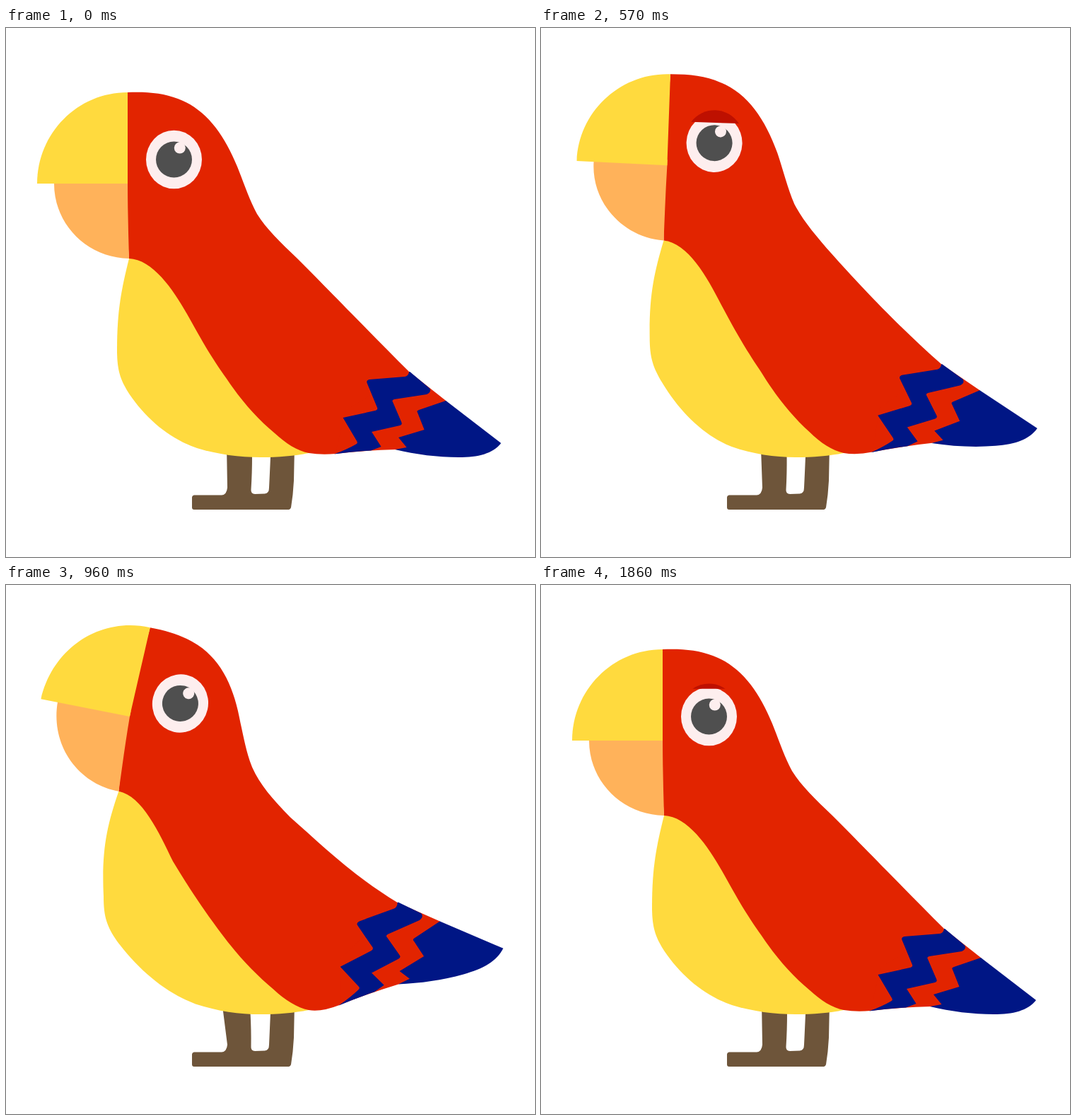
An HTML page for the animation above (1.89 s loop, 748 by 748 pixels).

```html
<!DOCTYPE html>
<html lang="en">
<head>
<meta charset="utf-8">
<title>Parrot</title>
<style>
  html, body { margin: 0; width: 100%; height: 100%; overflow: hidden; background: #fff; }
  svg { display: block; width: 100vw; height: 100vh; }
  .red { fill: #e22400; }
  .yellow { fill: #ffda3e; }
  .orange { fill: #ffb25a; }
  .blue { fill: #001685; }
  .brown { fill: #6e553a; }
  .white { fill: #fdeeee; }
  .pupil { fill: #4f4f4f; }
  .lid { fill: #be1000; }
</style>
</head>
<body>
<!-- The bird at rest; the script bends every path with its bone -->
<svg viewBox="0 0 748 748">
  <path class="brown" data-bone="leg" d="M312 590L313 650Q312 660 305 660.5L266 660.5Q263 661 263 664L263 678Q263 681 266 681L400 681Q402 681 403 678Q406 660 407 640L408 590L374 590L374 606Q373 630 372 650Q372 658 366 658.5L352 659Q346 658.5 346.5 653Q348 630 348 604L348 590Z"/>
  <path class="yellow" data-bone="body" d="M174 326C163 370 157 400 157 455C157 485 162 498 174 517C199 554 232 581 270 594C300 603 330 607 360 607C385 607 408 605 428 601L400 480L280 330Z"/>
  <path class="red" data-bone="body" d="M172 91C200 90 222 92 243 100C283 115 308 150 327 196C336 218 344 243 355 263C368 284 388 303 412 326C450 364 515 431 570 486L466 602Q446 604 428 601C412 598 395 587 380 573C355 552 335 530 312 496C290 465 278 444 258 408C238 372 208 327 174 326L166 220Z"/>
  <path class="red" data-bone="tail" d="M570 486L622 527L640 570L600 600L551 596Q510 597 466 602L480 540Z"/>
  <path class="blue" data-bone="tail" d="M571 486L599 509.5Q602 515 595 518L549 525Q545 526 547 529L559 557Q561 561 557 562L517 571L530.5 592L516 597.5Q490 599 464 602.5Q482 596 495 588.5Q498 587 496 584L476.5 551L522 541Q526 540 525 537L510.5 502Q509 498 514 497L564 493Q569 492 570 486Z"/>
  <path class="blue" data-bone="tail" d="M622 527L584 540Q580 541 582 544L591.5 568L555 579L566.5 593L550 596C580 603 610 607 640 607C668 607 688 602 700 587Z"/>
  <path class="orange" data-bone="body" d="M68 220C68 278 115 325 174 326C173 290 172 255 172 220L172 212L70 214Z"/>
  <path class="yellow" data-bone="body" d="M44 220C44 149 101 91 172 91C172 140 172 175 172 220Z"/>
  <g id="eye">
    <ellipse class="white" rx="39.5" ry="41.3"/>
    <circle class="pupil" r="25.5"/>
    <circle class="white" cx="8.3" cy="-16.5" r="8"/>
    <path id="lid" class="lid"/>
  </g>
</svg>
<script>
const LOOP = 1890, CYCLE = 1800, STEP = 30;
const JOINT = [172, 220], PIVOT = [466, 602], EYE = [237.5, 186];
const LID_OPEN = -46.5, LID_LOW = 11;

// x, y: head shift; head, neck: turn in radians; bx, by: belly shift; lift: tail raise
const pose = (x, y, head, neck, bx, by, lift) => ({ x, y, head, neck, bx, by, lift });
const rest = pose(0, 0, 0, 0, 0, 0, 0);
const keys = [
  [60, rest],
  [360, pose(20, -8, -0.075, -0.025, 6, -8, 0)],
  [720, pose(-2, -40, 0.14, 0.14, -12, -25, 0.193)],
  [840, pose(0, -43.5, 0.19, 0.165, -16, -25, 0.3)],
  [960, pose(3, -34, 0.225, 0.165, -19, -15, 0.277)],
  [1140, pose(3, -17, 0.13, 0.095, -12, -5, 0.167)],
  [1380, rest],
];

const clamp = v => Math.min(1, Math.max(0, v));
const mix = (a, b, k) => a + (b - a) * k;
const ease = k => (1 - Math.cos(Math.PI * clamp(k))) / 2;

// Slope at a key; the turning poses come to a stop
function slope(i, name) {
  if (i < 2 || i === keys.length - 1) return 0;
  const [a, b, c] = keys.slice(i - 1, i + 2);
  const h = b[0] - a[0], g = c[0] - b[0];
  return ((b[1][name] - a[1][name]) / h * g + (c[1][name] - b[1][name]) / g * h) / (h + g);
}

function poseAt(t) {
  const next = keys.findIndex(k => k[0] > t);
  if (next < 1) return rest;
  const [t0, a] = keys[next - 1], [t1, b] = keys[next];
  const h = t1 - t0, s = (t - t0) / h, out = {};
  for (const name in a) {
    out[name] = mix(a[name], b[name], s * s * (3 - 2 * s))
      + h * s * (1 - s) * ((1 - s) * slope(next - 1, name) - s * slope(next, name));
  }
  return out;
}

function turn(p, x, y, angle) {
  const dx = x - JOINT[0], dy = y - JOINT[1];
  const cos = Math.cos(angle), sin = Math.sin(angle);
  return [JOINT[0] + p.x + dx * cos - dy * sin, JOINT[1] + p.y + dx * sin + dy * cos];
}

const bones = {
  tail(p, x, y) {
    return [
      x + 0.15 * p.x + p.lift * (20 + 0.7 * (y - PIVOT[1])),
      y - p.lift * (30 + x - PIVOT[0]),
    ];
  },
  // Head turns to neck, neck fades into belly and back, belly fades to its underside
  body(p, x, y) {
    if (x > 460) return bones.tail(p, x, y);
    const [nx, ny] = turn(p, x, y, mix(p.head, p.neck, clamp((y - 180) / 80)));
    const neck = 1 - clamp((x - 360) / 130), belly = clamp((430 - x) / 180);
    const down = clamp((y - 320) / 135), fade = clamp((606 - y) / 100);
    return [
      x + fade * mix((nx - x) * neck, p.bx * belly, down),
      y + fade * mix((ny - y) * neck, p.by * belly, down),
    ];
  },
  leg(p, x, y) {
    return [x + 0.35 * p.bx * clamp((650 - y) / 55) * clamp((375 - x) / 60), y];
  },
};

const parts = [...document.querySelectorAll('[data-bone]')].map(el => ({
  el, shape: el.getAttribute('d'), bone: bones[el.dataset.bone],
}));
const eye = document.getElementById('eye'), lid = document.getElementById('lid');

function draw(t) {
  const p = poseAt(t);
  for (const { el, shape, bone } of parts) {
    el.setAttribute('d', shape.replace(/([\d.]+) ([\d.]+)/g,
      (_, x, y) => bone(p, +x, +y).map(v => v.toFixed(2)).join(' ')));
  }
  eye.setAttribute('transform',
    `translate(${turn(p, ...EYE, p.head).join(' ')}) rotate(${p.head * 180 / Math.PI})`);

  const edge = mix(LID_OPEN, LID_LOW, ease(t / 260) - ease((t - 420) / 240));
  const half = 42.5 * Math.sqrt(Math.max(0, 1 - ((edge + 1.5) / 45) ** 2));
  const large = edge > -1.5 ? 1 : 0;
  lid.setAttribute('d', half < 1 ? '' : `M${-half} ${edge}A42.5 45 0 ${large} 1 ${half} ${edge}Z`);
}

const start = performance.now();
function tick() {
  const t = Math.max(0, performance.now() - start) % LOOP;
  draw(Math.floor(t / STEP) * STEP % CYCLE);
  requestAnimationFrame(tick);
}
tick();
</script>
</body>
</html>
```
